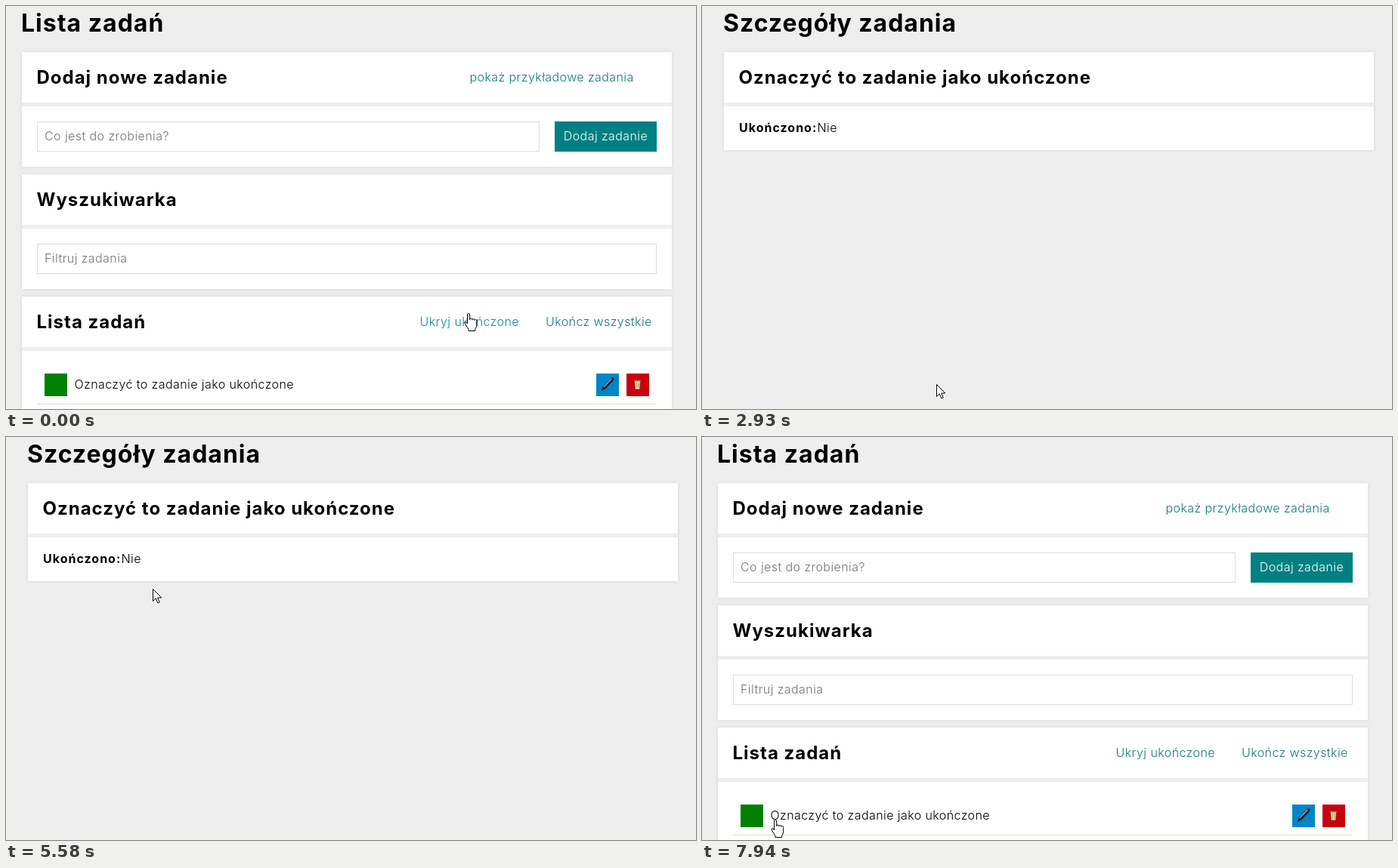
Animation, 913 px wide and 534 px high, one loop 8000 ms. Source, as an HTML page:

```html
<!DOCTYPE html>
<html lang="pl">
<head>
<meta charset="utf-8">
<title>Lista zadań</title>
<style>
  html, body { margin: 0; width: 100%; height: 100%; overflow: hidden; background: #eee; }
  svg { display: block; width: 913px; height: 534px; font-family: Inter, "Open Sans", sans-serif; }
  text { font-size: 16px; font-weight: 350; letter-spacing: .42px; white-space: pre; }
  .h1 { font-size: 32px; font-weight: 700; letter-spacing: 1px; }
  .h2 { font-size: 24px; font-weight: 700; letter-spacing: 1px; }
  .strong { font-weight: 700; letter-spacing: 1px; }
  .hint { fill: #757575; }
  .link { fill: #187878; }
  .link.hover { fill: #0c88a6; }
  .label { fill: #fff; text-anchor: middle; }
  .panel { fill: #fff; filter: drop-shadow(0 0 2px #d4d4d4); }
  .rule { fill: #eee; }
  .line { fill: #ddd; }
  .add { fill: #008080; }
  .done { fill: #008000; }
  .edit { fill: #0085c8; }
  .remove { fill: #c8000f; }
  .field { fill: #fff; stroke: #ddd; }
  .pointer { fill: #fff; stroke: #000; stroke-linejoin: round; }
</style>
</head>
<body>
<svg viewBox="0 0 913 534">
  <g id="list"></g>
  <g id="detail"></g>
  <circle id="click" cx="310" cy="501" r="12" fill="#fe2"/>
  <g id="cursor">
    <path id="arrow" class="pointer" d="M.5.5v16l3.8-3.6 2.6 6 2.3-1-2.6-5.9h5.2z"/>
    <path id="hand" class="pointer" d="M-1.5 13V1a1.6 1.6 0 0 1 3.2 0V7.5a1.6 1.6 0 0 1 3.2.3a1.5 1.5 0 0 1 3 .7a1.4 1.4 0 0 1 2.8.8V15q0 3-2 5v2.5H0v-2L-4.6 13q-1-2 .6-2.4q1.2-.2 2.5 2.4z"/>
    <path id="beam" fill="none" stroke="#000" d="M-3-8.500h2.500l.5.500.5-.5H4M.5-8V8M-3 8.500h2.500l.5-.5.5.5H4"/>
  </g>
</svg>
<script>
const LOOP = 8000;
const OPEN = 2930, BACK = 6950;      // detail view on screen
const PRESS = 2520, FADE = 70;       // click highlight

const $ = id => document.getElementById(id);
const show = (id, on) => { $(id).style.display = on ? "" : "none"; };

const rect = (cls, x, y, w, h) =>
  `<rect class="${cls}" x="${x}" y="${y}" width="${w}" height="${h}"/>`;
const text = (cls, x, y, str) => `<text class="${cls}" x="${x}" y="${y}">${str}</text>`;
const field = (x, y, w, hint) =>
  rect("field", x + .5, y + .5, w - 1, 39) + text("hint", x + 10, y + 25, hint);
const panel = (x, y, body, title) =>
  rect("panel", x, y, 860, 72 + body) + rect("rule", x, y + 67, 860, 5) +
  text("h2", x + 19.500, y + 42, title);

const task = "Oznaczyć to zadanie jako ukończone";
const pen = `<path d="M787.5 510l2-5 11-11.5q2-2 3.5-.5t-.5 3.5l-11 11.5z" fill="#1d1d22"/>
  <path d="M791 505l10.5-11" stroke="#a9a9ad" stroke-width="1.2"/>`;
const bin = `<path d="M831.5 497h8l-.8 11h-6.4z" fill="#f0d9a4" stroke="#5c2a12" stroke-width=".7"/>
  <path d="M831 496.500h9M834 499v7M837 499v7" stroke="#b98d55"/>`;

const titles = ["Dodaj nowe zadanie", "Wyszukiwarka", "Lista zadań"];

$("list").innerHTML =
  text("h1", 20, 34, "Lista zadań") +
  titles.map((title, i) => panel(21, 61 + 162 * i, 80, title)).join("") +
  text("link", 613.5, 100, "pokaż przykładowe zadania") +
  field(41, 153, 665, "Co jest do zrobienia?") +
  rect("add", 726, 153, 135, 40) + text("label", 793.5, 178, "Dodaj zadanie") +
  field(41, 315, 820, "Filtruj zadania") +
  text("link", 547.5, 424, "Ukryj ukończone") +
  text("link", 714, 424, "Ukończ wszystkie") +
  rect("done", 51, 487, 30, 30) + text("task", 90.5, 507, task) +
  rect("edit", 781, 487, 30, 30) + pen +
  rect("remove", 821, 487, 30, 30) + bin +
  rect("line", 41, 527, 820, 1);

$("detail").innerHTML =
  text("h1", 28, 34, "Szczegóły zadania") +
  panel(29, 61, 58, task) +
  text("strong prose", 49, 167, "Ukończono:") + text("prose", 152.5, 167, "Nie");

// Turning points of the pointer: time, x, y
const path = [
  [330, 612, 408], [775, 462, 335], [1150, 319, 423], [1800, 307, 515],
  [2060, 310, 501], [3400, 310, 501], [3700, 329, 390], [4240, 285, 133],
  [5090, 68, 182], [5580, 194, 201], [5940, 273, 209], [6280, 462, 302],
  [6540, 462, 302], [6820, 516, 347], [BACK, 516, 347], [7370, 330, 445],
  [7940, 97, 508]
];

function slope(i, axis) {
  const a = path[i - 1], b = path[i], c = path[i + 1];
  if (!a || !c) return 0;
  const p = (b[axis] - a[axis]) / (b[0] - a[0]);
  const q = (c[axis] - b[axis]) / (c[0] - b[0]);
  return p * q > 0 ? 2 * p * q / (p + q) : 0;
}

// Monotone cubic interpolation
function at(t, axis) {
  const i = path.findIndex(p => p[0] > t);
  if (i === 0) return path[0][axis];
  if (i < 0) return path[path.length - 1][axis];
  const a = path[i - 1], b = path[i], d = b[0] - a[0];
  const u = (t - a[0]) / d, v = 1 - u;
  return v * v * ((1 + 2 * u) * a[axis] + u * d * slope(i - 1, axis))
       + u * u * ((1 + 2 * v) * b[axis] - v * d * slope(i, axis));
}

function under(selector, x, y) {
  const pad = 3;
  return [...document.querySelectorAll(selector)].find(el => {
    const box = el.getBBox();
    return Math.abs(x - box.x - box.width / 2) <= box.width / 2 + pad &&
           Math.abs(y - box.y - box.height / 2) <= box.height / 2 + pad;
  });
}

function draw(t) {
  const detail = t >= OPEN && t < BACK;
  const x = Math.round(at(t, 1)), y = Math.round(at(t, 2));
  show("list", !detail);
  show("detail", detail);

  const target = detail ? null : under("#list .link, #list .task", x, y);
  const beam = !!under(detail ? "#detail .prose" : "#list .field", x, y);
  show("hand", !!target);
  show("beam", !target && beam);
  show("arrow", !target && !beam);
  $("cursor").setAttribute("transform", `translate(${x} ${y})`);
  document.querySelectorAll(".link").forEach(el => el.classList.toggle("hover", el === target));

  show("click", t >= PRESS && t < OPEN);
  const step = Math.min(2, Math.floor((t - PRESS) / FADE));
  $("click").setAttribute("opacity", Math.max(0, .4 + .15 * step));
}

function frame() {
  draw(performance.now() % LOOP);
  requestAnimationFrame(frame);
}
frame();
</script>
</body>
</html>
```
